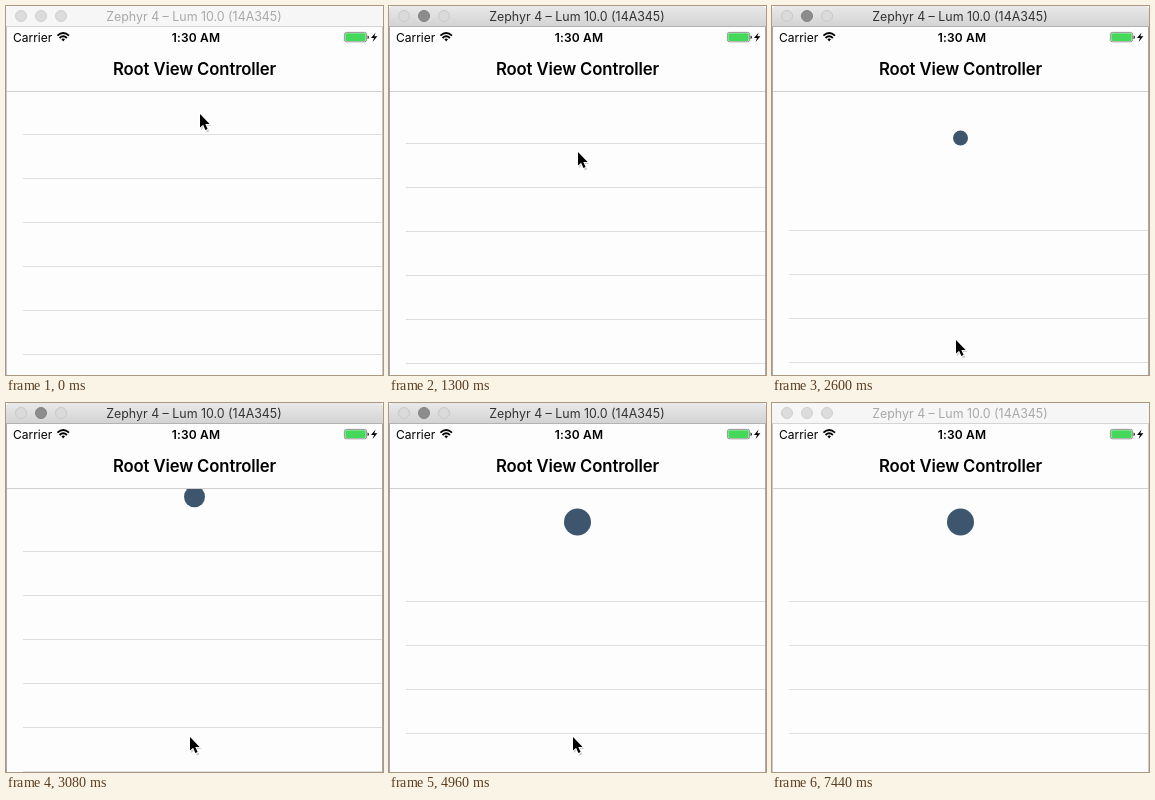
These frames come from a looping animation (377 px wide and 369 px high, 7.48 s). An HTML page:

```html
<!DOCTYPE html>
<html lang="en">
<head>
<meta charset="utf-8">
<title>Pull to refresh</title>
<style>
  html, body { margin: 0; width: 100%; height: 100%; overflow: hidden; background: #fff; }
  svg { display: block; }
  text { font-family: Inter, "Liberation Sans", sans-serif; }
  #bar { fill: url(#active); }
  #edge { stroke: #b2b2b2; }
  #sides { stroke: #a8a8a8; }
  #buttons { fill: #dadada; stroke: #c8c8c8; }
  #buttons .dark { fill: #8c8c8c; stroke: #828282; }
  #caption { fill: #333; }
  .idle #bar { fill: #f6f6f6; }
  .idle #edge { stroke: #d4d4d4; }
  .idle #sides { stroke: #c8c8c8; }
  .idle #buttons, .idle #buttons .dark { fill: #dcdcdc; stroke: #d0d0d0; }
  .idle #caption { fill: #a9a9a9; }
</style>
</head>
<body>
<svg id="stage" width="377" height="369" viewBox="0 0 377 369">
  <defs>
    <linearGradient id="active" x2="0" y2="1">
      <stop stop-color="#e9e9e9"/><stop offset="1" stop-color="#d2d2d2"/>
    </linearGradient>
  </defs>
  <rect y="20" width="377" height="349" fill="#fdfdfd"/>
  <path id="rows" stroke="#dedede"/>
  <circle id="mark" cx="188.5" fill="#3d566e"/>

  <!-- navigation and status bars -->
  <rect y="20" width="377" height="65" fill="#fdfdfd"/>
  <path d="M0 85.5H377" stroke="#d0d0d0"/>
  <g text-anchor="middle" font-weight="600">
    <text x="188.5" y="69" font-size="16.7" letter-spacing="-.13">Root View Controller</text>
    <text x="190" y="35.5" font-size="12" letter-spacing=".15">1:30 AM</text>
  </g>
  <text x="7" y="35.5" font-size="12">Carrier</text>
  <g fill="none" stroke="#000" stroke-width="1.8">
    <path d="M51.4 29.6Q57.2 24.4 63 29.6M53.5 32Q57.2 28.6 60.9 32"/>
    <path d="M55.4 33.3Q57.2 31.8 59 33.3L57.2 35.4Z" fill="#000" stroke="none"/>
  </g>
  <rect x="338.4" y="26.4" width="22.2" height="9.4" rx="2" fill="#fff" stroke="#666" stroke-width=".7"/>
  <rect x="339.3" y="27.3" width="20.4" height="7.6" rx="1" fill="#45d95c"/>
  <path d="M361.5 29.5Q363 29.8 363 31.2T361.5 33Z" fill="#333"/>
  <path d="M369.6 26.5L365 32H368L366.6 36L371.4 30.3H368.3Z"/>

  <!-- window frame -->
  <path id="sides" d="M.5 20V369M376.5 20V369"/>
  <path id="bar" d="M0 21V4Q0 0 4 0H373Q377 0 377 4V21Z"/>
  <path id="edge" d="M0 20.5H377"/>
  <g id="buttons">
    <circle cx="15" cy="10" r="5.5"/>
    <circle cx="35" cy="10" r="5.5" class="dark"/>
    <circle cx="55" cy="10" r="5.5"/>
  </g>
  <text id="caption" x="188" y="14.8" font-size="12.4" text-anchor="middle">Zephyr 4 – Lum 10.0 (14A345)</text>

  <g id="cursor">
    <path d="M1 1.5V16L4.3 13L6.8 18.5L9.4 17.3L7 12H11.5Z" opacity=".18"/>
    <path d="M0 0V13.5L3.1 10.7L5.4 16L7.6 15L5.3 10H9.6Z" stroke="#fff" stroke-width="1.6" paint-order="stroke"/>
  </g>
</svg>
<script>
const LOOP = 7480, TICK = 118.1, ROW = 44;
const $ = id => document.getElementById(id);
const set = (id, name, value) => $(id).setAttribute(name, value);

// Progress from 0 to 1 between two ticks
const ramp = (n, from, to) => Math.min(1, Math.max(0, (n - from) / (to - from)));
const easeOut = f => 1 - (1 - f) ** 2;

// Grab, drag down, then dip and settle after release
function pull(n) {
  const drag = 9 * ramp(n, 8, 11) + 87 * easeOut(ramp(n, 12, 20));
  const dip = 62 * Math.sin(Math.PI * ramp(n, 23, 28));
  return drag - 26 * easeOut(ramp(n, 23, 30)) - dip;
}

// Drift, grab, drag down, then leave at the lower right
function pointer(n) {
  const drift = ramp(n, 1, 5), grab = ramp(n, 7, 11);
  const drag = easeOut(ramp(n, 12, 20)), exit = ramp(n, 44, 56);
  return [
    194 - 4 * drift - grab - 5 * drag + 155 * exit ** 1.6,
    108 - 5 * drift + 43 * grab + 188 * drag + 37 * exit ** 2
  ];
}

function draw(now) {
  // The screen refreshes in steps of one tick
  const n = Math.floor((now % LOOP + 3) / TICK);
  const offset = pull(n);

  let lines = "";
  for (let y = 128.5 + Math.round(offset); y < 369; y += ROW) lines += `M17 ${y}H376`;
  set("rows", "d", lines);
  set("mark", "cy", 84 + offset / 2);
  set("mark", "r", 13.5 * ramp(n, 12, 30));
  set("cursor", "transform", `translate(${pointer(n)})`);
  $("stage").classList.toggle("idle", n < 8 || n >= 61);
  requestAnimationFrame(draw);
}
requestAnimationFrame(draw);
</script>
</body>
</html>
```
